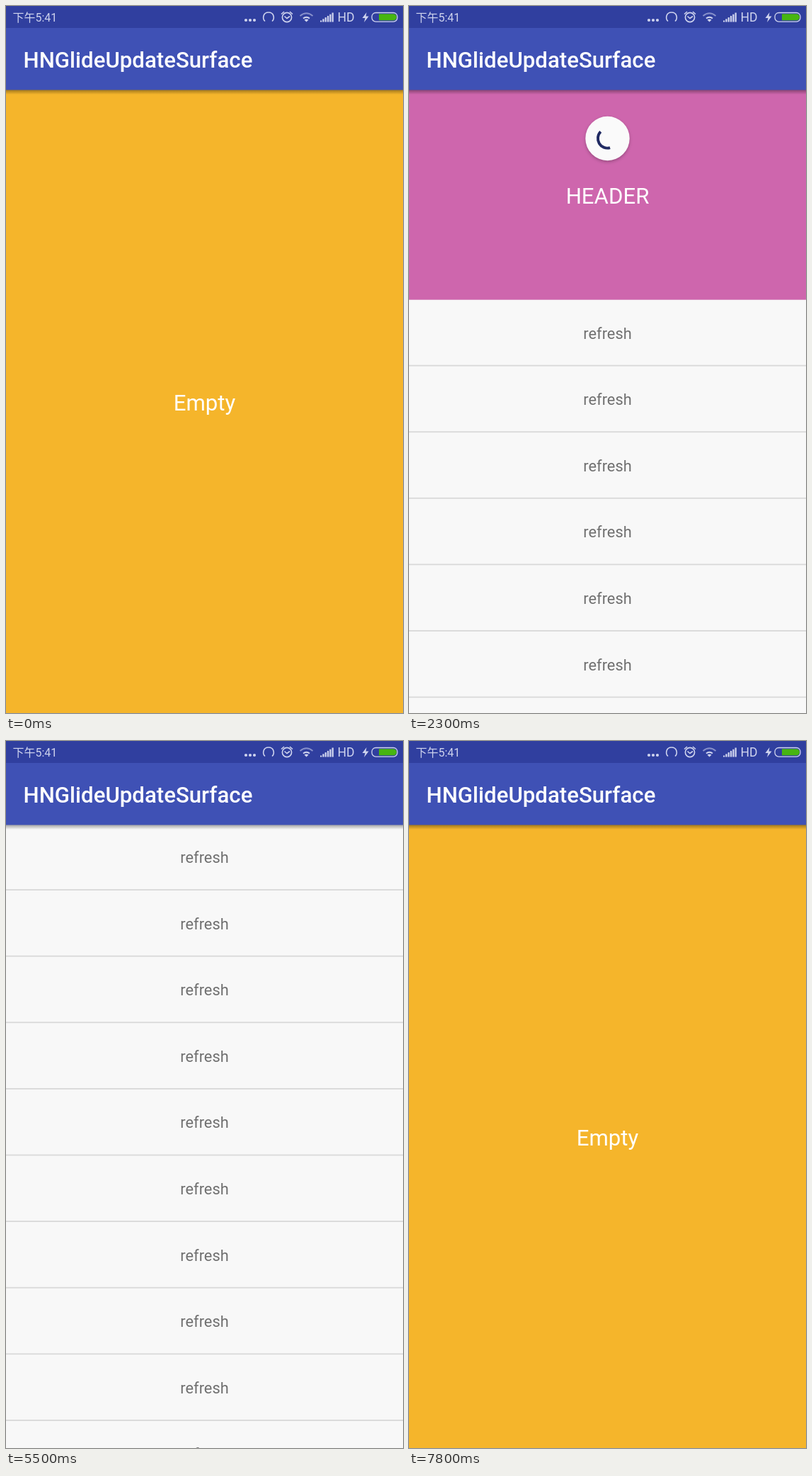
Write an HTML page that moves like this. It is 561 by 998 pixels and loops after 8 s.

```html
<!DOCTYPE html>
<html lang="zh">
<head>
<meta charset="utf-8">
<style>
  html, body { margin: 0; width: 100%; height: 100%; overflow: hidden; background: #000; }
  svg { display: block; width: 100%; height: 100%; }
  text { font-family: Roboto, "Noto Sans CJK SC", "Noto Sans CJK", sans-serif; }
  .mid { text-anchor: middle; }
  .title { font-size: 31.2px; font-weight: 500; fill: #fff; }
  .big { font-size: 31.2px; fill: #fff; }
  .menu { font-size: 21.8px; fill: #46536a; }
  .row { font-size: 21.8px; fill: #707070; }
  .foot { font-size: 18.7px; fill: #3a5656; }
  #disc { filter: drop-shadow(0 2px 2px rgba(0, 0, 0, .25)); }
</style>
</head>
<body>
<svg id="stage" viewBox="0 0 561 998" preserveAspectRatio="none"></svg>
<script>
const W = 561, H = 998, LOOP = 8000, STEP = 100;
const ROWS = 20, ROW_TOP = 414.7, ROW_H = 93.6, SCROLL = 1351;
const MID = W / 2, SPIN_Y = 187;

const label = (cls, y, s) => `<text class="mid ${cls}" x="${MID}" y="${y}">${s}</text>`;
const box = (y, h, fill) => `<rect y="${y}" width="${W}" height="${h}" fill="${fill}"/>`;

const appBar = box(118, 7, 'url(#shade)') + box(0, 31.2, '#303f9f') + box(31, 87.5, '#3f51b5') +
  '<text class="title" x="24.5" y="87">HNGlideUpdateSurface</text>';

const page = (id, bg, content) => `<g id="${id}">${box(0, H, bg)}${content}${appBar}</g>`;

const listRow = i => {
  const y = ROW_TOP + i * ROW_H;
  return label('row', y + 54.8, 'refresh') + box(y + 92, 1.8, '#d9d9d9');
};

const footY = 965 + SCROLL;
const list = `<g id="scroller">
  ${box(118, ROW_TOP - 118, '#ce66ad')}${label('big', 279, 'HEADER')}
  ${Array.from({ length: ROWS }, (_, i) => listRow(i)).join('')}
  <circle cx="239.5" cy="${footY}" r="15.7" fill="none" stroke="#878787" stroke-width="5"/>
  <path id="glint" fill="none" stroke="#d0688c" stroke-width="2" opacity=".6"/>
  <text class="foot" x="265.5" y="${footY + 5.5}">加载中...</text>
</g>
<g id="spinner">
  <circle id="disc" r="31.2" fill="#fafafa"/>
  <path id="arc" fill="none" stroke="#202a62" stroke-width="3.9"/>
</g>`;

const menu = ['普通模式', '列表模式', '列表模式空视图']
  .map((s, i) => label('menu', 173 + i * 61, s)).join('');

const bars = [0, 1, 2, 3, 4, 5]
  .map(i => `<rect x="${444 + i * 3.3}" y="${20.5 - i * 2.2}" width="2.3" height="${2 + i * 2.2}"/>`).join('');

const statusBar = `<g fill="#cfd4ee">
  <text x="9.5" y="22" font-size="16">下午5:41</text>
  <circle cx="339" cy="20" r="2.1"/><circle cx="345" cy="20" r="2.1"/><circle cx="351" cy="20" r="2.1"/>
  <g fill="none" stroke="#cfd4ee" stroke-width="1.6">
    <path d="M366 21.5C362 18 363 9 371 9S380 18 376 21.5"/>
    <circle cx="397" cy="16" r="6.6"/>
    <path d="M393.5 14.5l3.5 3 4-3M389 11.5l4-3.5M405 11.5l-4-3.5"/>
    <path d="M420 17.5q4.5-3.5 9 0" stroke-width="2"/>
    <path d="M415.5 14q9-7.5 18 0" stroke-width="2" opacity=".55"/>
    <rect x="517" y="9.5" width="36" height="12.6" rx="5.5" stroke-width="1.3"/>
  </g>
  <path d="M421.5 19.5q3-2 6 0l-3 3z"/>
  ${bars}
  <text x="468.5" y="22.3" font-size="17.5">HD</text>
  <path d="M509.5 9l-6 8h4l-1.5 6 6.5-8.5h-4z"/>
  <path d="M527 11.3h20.5a4.4 4.4 0 0 1 0 9H527z" fill="#47b512"/>
</g>`;

const stage = document.getElementById('stage');
stage.innerHTML = `<defs><linearGradient id="shade" x2="0" y2="1">
    <stop stop-opacity=".36"/><stop offset="1" stop-opacity="0"/></linearGradient></defs>` +
  page('menuPage', '#fefefe', menu) +
  page('listPage', '#f8f8f8', list) +
  page('emptyPage', '#f5b52b', label('big', 570.5, 'Empty')) + statusBar;

const el = id => document.getElementById(id);
const [menuPage, listPage, emptyPage, scroller, spinner, arc, glint] =
  ['menuPage', 'listPage', 'emptyPage', 'scroller', 'spinner', 'arc', 'glint'].map(el);

const span = (t, from, to) => Math.min(1, Math.max(0, (t - from) / (to - from)));
const smooth = u => u * u * (3 - 2 * u);
const move = (node, x, y, scale = 1) =>
  node.setAttribute('transform', `translate(${x} ${y}) scale(${scale})`);

function arcPath(cx, cy, r, start, sweep) {
  const point = deg => {
    const a = deg * Math.PI / 180;
    return `${cx + r * Math.cos(a)} ${cy + r * Math.sin(a)}`;
  };
  return `M${point(start)}A${r} ${r} 0 ${sweep > 180 ? 1 : 0} 1 ${point(start + sweep)}`;
}

// The covering page's x and how far the menu is pushed aside.
const opening = u => [W * (1 - u) ** 3, 1 - (1 - u) ** 3];
const closing = u => [W * (1 - (1 - u) ** 6), (1 - u) ** 3];

function drawPages(t) {
  const isList = t >= 900 && t < 7000;
  const [x, push] =
    t < 900 ? closing(span(t, 0, 400)) :
    t < 6400 ? opening(span(t, 900, 1300)) :
    t < 7000 ? closing(span(t, 6480, 6880)) :
    opening(span(t, 7350, 7750));
  move(menuPage, -0.3 * W * push, 0);
  move(listPage, isList ? x : W, 0);
  move(emptyPage, isList ? W : x, 0);
}

function drawSpinner(t) {
  const pull = smooth(span(t, 1400, 1900));
  const y = 84 + 126 * pull - (210 - SPIN_Y) * span(t, 1900, 2000);
  const size = 1 - span(t, 3000, 3200);
  move(spinner, MID, y, size);
  spinner.style.display = t > 1400 && size > 0 ? '' : 'none';

  let start = -60 + 86 * pull, sweep = 22 + 250 * pull;
  if (t >= 2000) {
    const turns = (t - 2000) / 1332, u = turns % 1;
    const tail = 300 * smooth(span(u, 0.5, 1));
    start = 26 + 216 * turns + 300 * Math.floor(turns) + tail;
    sweep = 22 + 300 * smooth(span(u, 0, 0.5)) - tail;
  }
  arc.setAttribute('d', arcPath(0, 0, 13.6, start, sweep));
  arc.setAttribute('opacity', t < 1900 ? 0.3 + 0.7 * pull : 1);
}

function drawList(t) {
  const down = smooth(span(t, 3400, 4300)) - smooth(span(t, 5300, 6100));
  move(scroller, 0, -SCROLL * down);
  glint.setAttribute('d', arcPath(239.5, footY, 14.5, -75 + (t - 4600) * 0.3, 32));
  glint.style.display = t < 4800 ? '' : 'none';
}

function frame(now) {
  const t = Math.floor((now % LOOP) / STEP) * STEP;
  drawPages(t);
  drawSpinner(t);
  drawList(t);
  requestAnimationFrame(frame);
}
frame(0);
</script>
</body>
</html>
```
